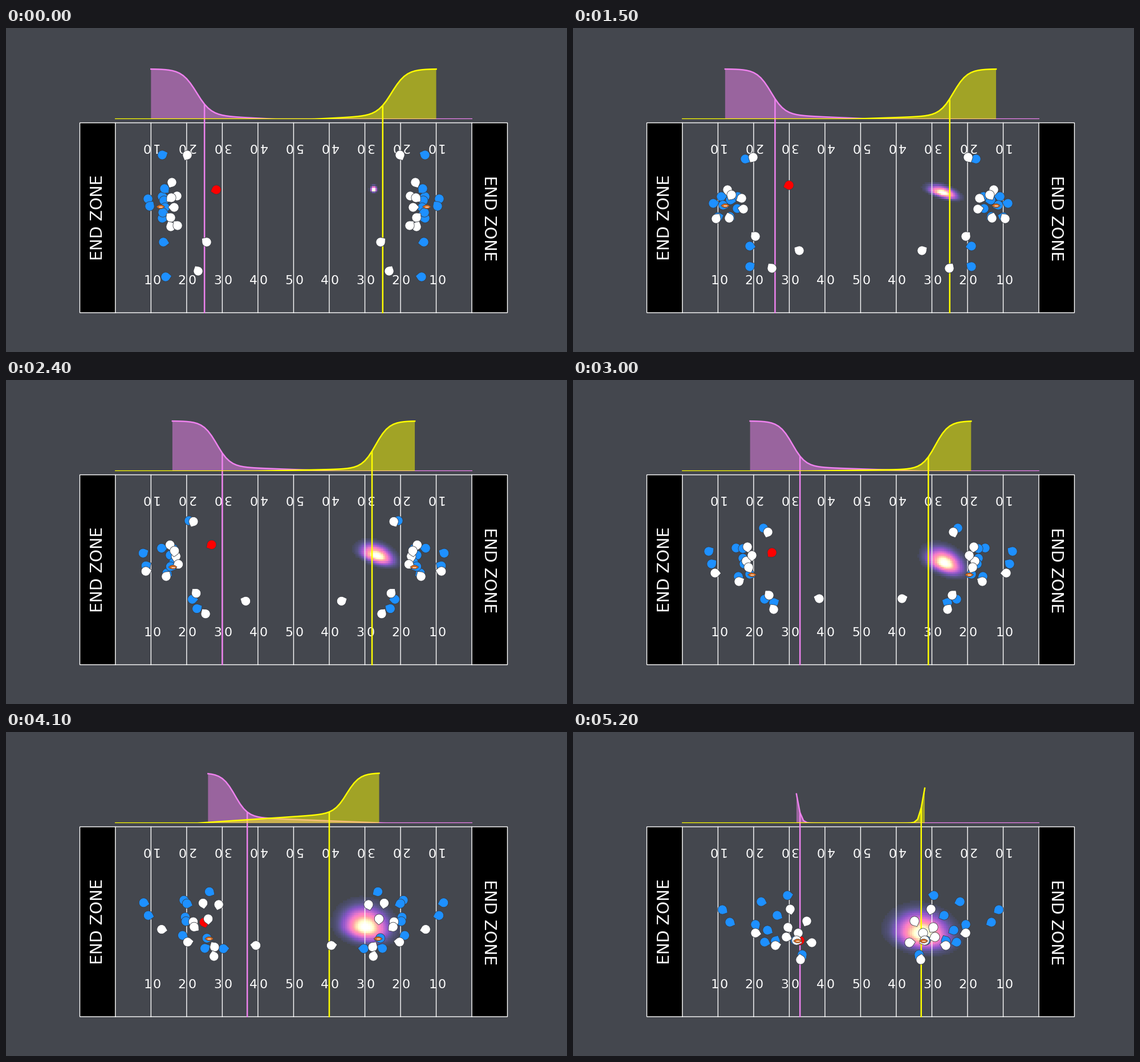
Animation of 984 by 569 pixels, one loop 5.3 s. Source, as a matplotlib script:

```python
import numpy as np
import matplotlib.pyplot as plt
from matplotlib.animation import FuncAnimation
from matplotlib.collections import PolyCollection
from matplotlib.colors import to_rgb
from matplotlib.patches import Polygon, Rectangle

W, H, DPI = 984, 569, 100
PX = 72 / DPI
FRAMES, INTERVAL = 53, 100

BG, INK = "#44474e", "#393c43"
BLUE, WHITE, RED = "dodgerblue", "white", "red"
VIOLET, YELLOW, BALL = "violet", "yellow", "chocolate"

YARD = 6.253
LEFT, RIGHT = 191.8, 817.1
TOP, BOTTOM = 166.5, 500
BASE, PEAK = 160, 88
MIRROR = 1009

# Each run is a cubic through four places at these times.
TIMES = [0, 15, 30, 52]
OFFENSE = [
    [(274, 223), (302, 230), (334, 260), (376, 287)],
    [(249, 300), (246, 308), (238, 301), (262, 312)],
    [(274, 334), (254, 332), (243, 323), (275, 334)],
    [(274, 296), (260, 296), (286, 295), (330, 298)],
    [(278, 282), (289, 296), (298, 296), (358, 322)],
    [(277, 303), (276, 302), (298, 313), (320, 338)],
    [(279, 315), (288, 317), (300, 323), (341, 348)],
    [(275, 324), (275, 331), (290, 345), (336, 369)],
    [(276, 376), (310, 383), (336, 385), (355, 367)],
    [(280, 437), (310, 419), (352, 391), (402, 391)],
    [(252, 313), (263, 311), (310, 341), (390, 366)],
]
DEFENSE = [
    [(369, 284), (379, 276), (349, 303), (398, 366)],
    [(318, 223), (316, 227), (342, 267), (410, 332)],
    [(291, 271), (271, 284), (306, 293), (381, 311)],
    [(300, 295), (296, 299), (304, 318), (377, 343)],
    [(290, 298), (278, 293), (314, 308), (395, 353)],
    [(295, 315), (299, 318), (308, 329), (374, 360)],
    [(289, 333), (274, 334), (291, 354), (355, 375)],
    [(289, 349), (251, 335), (249, 339), (320, 353)],
    [(301, 347), (320, 366), (344, 378), (392, 366)],
    [(352, 376), (397, 391), (432, 384), (419, 370)],
    [(337, 427), (349, 422), (352, 403), (399, 400)],
]


def runs(points):
    return [np.polyfit(TIMES, p, 3) for p in points]


def place(run, t):
    return np.array([t ** 3, t ** 2, t, 1]) @ run


offense, defense = runs(OFFENSE), runs(DEFENSE)
tackler, carrier = defense[0], offense[-1]


def ball_at(t):
    snap = 15 * max(0, 1 - t / 8)
    return place(carrier, t) + [4 + snap, 1]


# Key points of the curves and the heat map
PHASES = [0, 15, 30, 41, 52]


def phase(t, values):
    return np.interp(t, PHASES, values)


def cloud(t):
    """Skewed bell of light added to the background."""
    cx = phase(t, [644, 648, 651, 630, 612])
    cy = phase(t, [284, 290, 322, 343, 355])
    wide = phase(t, [3, 14, 17.5, 23, 27])
    high = phase(t, [3, 5.6, 12, 17, 18])
    dx = GX - cx
    dy = GY - cy - phase(t, [0, .25, .28, .1, .1]) * dx
    skew = np.where(dy < 0, 1.2, .8)
    v = np.exp(-.5 * ((dx / wide) ** 2 + (dy / high / skew) ** 2))
    v /= v.max()
    glow = MAGMA(v)[..., :3] * (v > .03)[..., None]
    return np.minimum(1, glow + to_rgb(BG))


CELL = YARD / 2
COLS, ROWS = 56, 42
CX0, CY0 = 644 - 34 * CELL, 284 - 6 * CELL
GX, GY = np.meshgrid(CX0 + (np.arange(COLS) + .5) * CELL,
                     CY0 + (np.arange(ROWS) + .5) * CELL)
MAGMA = plt.get_cmap("magma")


def pin(pos, heading, r=8.1, tip=10.6):
    """Disc with a small point in the heading's direction."""
    gap = np.arccos(r / tip)
    a = np.linspace(gap, 2 * np.pi - gap, 36)
    shape = np.vstack([np.column_stack([r * np.cos(a), r * np.sin(a)]), [tip, 0]])
    c, s = np.cos(heading), np.sin(heading)
    return shape @ np.array([[c, s], [-s, c]]) + pos


def lens(x, y, w=7.5, h=3.6):
    u = np.linspace(-1, 1, 16)
    bow = h * (1 - u * u)
    return np.column_stack([np.r_[x + w * u, x - w * u], np.r_[y - bow, y + bow]])


def flip(shape):
    return shape * [-1, 1] + [MIRROR, 0]


fig = plt.figure(figsize=(W / DPI, H / DPI), dpi=DPI, facecolor=BG)
ax = fig.add_axes([0, 0, 1, 1])
ax.axis("off")

heat = ax.imshow(cloud(0), extent=(CX0, CX0 + COLS * CELL, CY0 + ROWS * CELL, CY0),
                 interpolation="nearest", aspect="auto", zorder=1)
ax.set_xlim(0, W)
ax.set_ylim(H, 0)


def label(x, y, text, size, turn=0):
    ax.text(x, y, text, color="white", fontsize=size * PX, family="DejaVu Sans",
            ha="center", va="baseline", rotation=turn, rotation_mode="anchor", zorder=3)


def box(x, width, **style):
    ax.add_patch(Rectangle((x, TOP), width, BOTTOM - TOP, snap=False, **style))


# Field
for x in (129.5, RIGHT):
    box(x, 62.4, fc="black", ec="none", zorder=1)
box(129.5, 750, fc="none", ec="white", lw=1.4 * PX, zorder=2)
for n in range(11):
    x = LEFT + n * 10 * YARD
    ax.plot([x, x], [TOP, BOTTOM], color="white", lw=1.4 * PX, snap=False, zorder=2)
    if 0 < n < 10:
        tens = min(n, 10 - n)
        near = 6 if tens == 1 else 8.5
        label(x - near, 450, str(tens), 22)
        label(x + 10, 450, "0", 22)
        label(x - 9, 202.5, "0", 22, 180)
        label(x + near, 202.5, str(tens), 22, 180)
label(169.3, 333, "END ZONE", 28.3, 90)
label(838.7, 334, "END ZONE", 28.3, 270)


class Curve:
    """Chance of reaching each yard: a steep drop plus a thin linear tail."""

    def __init__(self, color, drop, tail, mark, mirrored, z):
        self.drop, self.tail, self.goal, self.mirrored = drop, tail, mark, mirrored
        self.fill = ax.add_patch(Polygon([[0, 0]], fc=color, alpha=.5, lw=0, zorder=z))
        self.line, = ax.plot([], [], color=color, lw=2.5 * PX, snap=False, zorder=z + .1)
        self.line.set_clip_path(Rectangle((LEFT - 1, 60), RIGHT - LEFT + 2, BASE - 60,
                                          transform=ax.transData))
        self.mark, = ax.plot([], [], color=color, lw=2.5 * PX, snap=False,
                             solid_capstyle="butt", zorder=z + .2)

    def height(self, yard, t):
        center, weight = phase(t, self.drop), phase(t, self.tail)
        width = np.interp(t, [0, 41, 52], [2.05, 1.8, .6])
        length = np.interp(t, [0, 41, 52], [22, 42, 10])
        steep = 1 / (1 + np.exp((yard - center) / width))
        tail = np.clip(1 - (yard - center) / length, 0, 1)
        return BASE - PEAK * ((1 - weight) * steep + weight * tail)

    def px(self, yard):
        return RIGHT - yard * YARD if self.mirrored else LEFT + yard * YARD

    def update(self, t):
        start = np.ceil((place(carrier, t)[0] - LEFT) / YARD)
        yard = np.arange(start, 101)
        x, y = self.px(yard), self.height(yard, t)
        self.line.set_data(x, y)
        self.fill.set_xy(np.vstack([[x[0], BASE], np.column_stack([x, y]), [x[-1], BASE]]))
        goal = np.floor(phase(t, self.goal) + .5)
        self.mark.set_data([self.px(goal)] * 2, [self.height(goal, t), BOTTOM + 1])


curves = [
    Curve(VIOLET, [22.7, 24.8, 30.8, 33.5, 32.2], [.08, .09, .09, .12, 0],
          [25, 25.6, 33, 37, 33], False, 4),
    Curve(YELLOW, [22.4, 23.9, 29, 35, 32.5], [.08, .07, .04, .2, 0],
          [24.6, 24.6, 31, 40, 33], True, 5),
]

pins = ax.add_collection(PolyCollection([], edgecolors=INK, linewidths=.8 * PX, zorder=7),
                         autolim=False)
balls = ax.add_collection(PolyCollection([], facecolors=BALL, edgecolors=INK,
                                         linewidths=.6 * PX, zorder=8), autolim=False)
laces = [ax.plot([], [], color="white", lw=1.3 * PX, zorder=9,
                 solid_capstyle="butt")[0] for _ in range(2)]


def runner(run, t):
    """Offense looks downfield along its path."""
    vx, vy = place(run, t + .5) - place(run, t - .5)
    return pin(place(run, t), np.arctan2(vy, abs(vx) + .5))


def guard(run, t):
    """Defense looks at the ball."""
    dx, dy = ball_at(t) - place(run, t)
    return pin(place(run, t), np.arctan2(dy, dx))


def update(t):
    heat.set_data(cloud(t))
    for curve in curves:
        curve.update(t)

    blues = [runner(run, t) for run in offense]
    whites = [guard(run, t) for run in defense[1:]]
    blues += [flip(s) for s in blues]
    whites += [flip(s) for s in whites]
    pins.set_verts(blues + [guard(tackler, t)] + whites)
    pins.set_facecolor([BLUE] * len(blues) + [RED] + [WHITE] * len(whites))

    bx, by = ball_at(t)
    spots = [bx, MIRROR - bx]
    balls.set_verts([lens(x, by) for x in spots])
    for lace, x in zip(laces, spots):
        lace.set_data([x - 3, x + 3], [by, by])


anim = FuncAnimation(fig, update, frames=FRAMES, interval=INTERVAL, repeat=True,
                     repeat_delay=0, blit=False)
plt.show()
```
